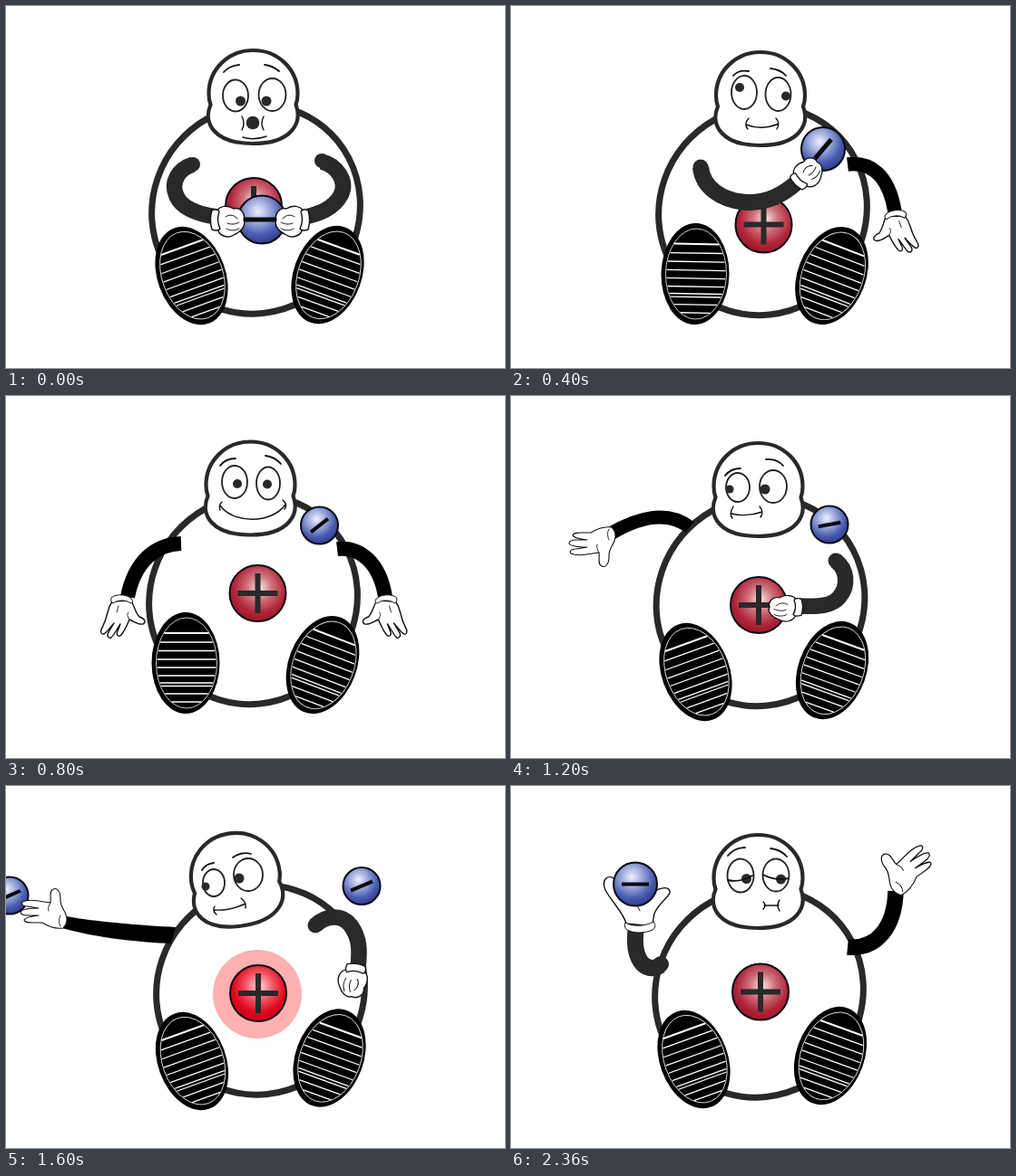
An HTML page that plays this animation: 550 by 400 pixels, repeating every 2600 ms.

```html
<!DOCTYPE html>
<html lang="en">
<head>
<meta charset="utf-8">
<title>Juggling buddy</title>
<style>
html, body { margin: 0; width: 100%; height: 100%; overflow: hidden; background: #fff; }
svg { display: block; width: 550px; height: 400px; }
</style>
</head>
<body>
<svg viewBox="0 0 550 400" xmlns="http://www.w3.org/2000/svg">
  <defs>
    <radialGradient id="red" cx=".53" cy=".4" r=".6">
      <stop offset="0" stop-color="#fae6e6"/><stop offset=".38" stop-color="#cf6f7a"/>
      <stop offset=".75" stop-color="#b0253a"/><stop offset="1" stop-color="#9d162a"/>
    </radialGradient>
    <radialGradient id="hot" cx=".52" cy=".38" r=".62">
      <stop offset="0" stop-color="#ffd9dc"/><stop offset=".4" stop-color="#f25562"/>
      <stop offset=".75" stop-color="#e0061c"/><stop offset="1" stop-color="#c40016"/>
    </radialGradient>
    <radialGradient id="blue" cx=".42" cy=".33" r=".68">
      <stop offset="0" stop-color="#eef1ff"/><stop offset=".35" stop-color="#9eabdc"/>
      <stop offset=".72" stop-color="#4a5cb0"/><stop offset="1" stop-color="#2e3d92"/>
    </radialGradient>
  </defs>
  <g id="stage"></g>
</svg>
<script>
const INK = '#292929', BLACK = '#000';

const line = (d, w = 1.4, color = '#111') =>
  `<path d="${d}" fill="none" stroke="${color}" stroke-width="${w}" stroke-linecap="round"/>`;
const shape = (d, w = 1.4) =>
  `<path d="${d}" fill="#fff" stroke="#111" stroke-width="${w}" stroke-linejoin="round"/>`;
const oval = (x, y, rx, ry, attrs) =>
  `<ellipse cx="${x}" cy="${y}" rx="${rx}" ry="${ry}" ${attrs}/>`;
const place = (transform, art) => `<g transform="${transform}">${art}</g>`;
const arm = (d, w, color = INK) =>
  `<path d="${d}" fill="none" stroke="${color}" stroke-width="${w}"/>`;
const dot = (x, y, r) => oval(x, y, r, r, `fill="${INK}"`);

function ball(x, y, r, fill, sign, w, color, turn = 0) {
  return place(`translate(${x} ${y})`,
    oval(0, 0, r - 1, r - 1, `fill="url(#${fill})" stroke="#0b0b12" stroke-width="2"`) +
    `<path d="${sign}" transform="rotate(${turn})" stroke="${color}" stroke-width="${w}"/>`);
}
const plus = (x, y, fill = 'red') => ball(x, y, 32, fill, 'M-22 0H22M0 -22V22', 6, INK);
const minus = (x, y, r, half, turn, w = 4) =>
  ball(x, y, r, 'blue', `M${-half} 0H${half}`, w, '#0b0b12', turn);

// Fist reaches along +x from the wrist
const fistArt =
  shape('M2 -9C6 -16 15 -16 21 -12C29 -14 34 -6 32 0C35 7 29 13 23 16C14 22 5 18 3 10Z') +
  shape('M-3 -10C0 -12 4 -11 5 -9C3 -3 3 4 6 10C4 13 0 12 -3 11C-5 4 -5 -4 -3 -10Z') +
  line('M13 10C18 13 23 12 27 10M12 -3C17 -7 23 -4 25 -1M14 4C19 6 23 5 27 3', 1);

// Open hand hangs along +y, thumb at -x
const openArt =
  shape('M-9 4C-13 12 -14 18 -18 22C-24 24 -26 28 -22 30C-16 31 -12 27 -7 25C-5 30 -2 37 2 42' +
    'C5 45 8 42 6 38L3 30C7 36 10 42 13 45C17 46 18 42 16 39L10 29C14 34 18 39 21 41' +
    'C25 42 25 37 23 34C20 28 18 22 17 17C16 12 14 8 12 5Z') +
  shape('M-10 3C-6 -3 8 -4 13 1C14 4 13 6 11 7C6 3 -4 3 -8 7C-10 7 -11 5 -10 3Z', 1) +
  line('M-6 17C-4 19 -5 22 -7 25M5 10L7 17', .9);

// Flat hand points along -x, thumb at -y
const flatArt =
  shape('M2 -8C0 -14 -5 -18 -4 -26C-4 -34 -8 -38 -12 -36C-17 -34 -14 -27 -15 -21L-22 -22' +
    'C-32 -24 -42 -24 -46 -22C-48 -19 -45 -17 -40 -17L-28 -15C-38 -15 -46 -14 -48 -11' +
    'C-48 -8 -44 -7 -40 -7L-28 -7C-36 -6 -43 -5 -44 -2C-43 1 -39 1 -34 1L-24 1' +
    'C-16 6 -8 8 -1 7C3 3 4 -3 2 -8Z', 1.1) +
  line('M-15 -21C-17 -18 -18 -15 -17 -12M-4 -7C-6 -3 -6 2 -4 5', .9);

const hand = (art, x, y, turn = 0, sx = 1, sy = 1) =>
  place(`translate(${x} ${y}) rotate(${turn}) scale(${sx} ${sy})`, art);

function foot([x, y, turn]) {
  let art = oval(0, 0, 37.5, 56, 'fill="#000"') +
    oval(1, 0, 33.5, 50, 'fill="none" stroke="#ddd" stroke-width=".9"');
  [-33, -23, -13.5, -4, 5, 14, 22, 25.5, 34, 43].forEach((v, i) => {
    const half = 33 * Math.sqrt(1 - v * v / 2500) - 1;
    art += line(`M${1 - half} ${v}H${1 + half}`, i ? 1.3 : 2, '#fff');
  });
  return place(`translate(${x} ${y}) rotate(${turn})`, art);
}

// Slightly fuller towards the upper right
const body = ([dx, dy]) => place(`translate(${275.5 + dx} ${224.5 + dy}) rotate(-50)`,
  oval(0, 0, 117.5, 113, `fill="#fff" stroke="${INK}" stroke-width="7"`));

const head = ([dx, dy, turn = 0]) => place(`translate(${dx} ${dy}) rotate(${turn} 272 101)`,
  `<path d="M225.500 109C224 105 223.500 101 223.500 97C223.500 70 245 49 272.500 49C300 49 321.500 70 321.500 97
   C321.500 101 321 105 319.500 109C327 129 315 152 272 152C229 152 217 129 225.500 109Z"
   fill="#fff" stroke="${INK}" stroke-width="4.2" stroke-linejoin="round"/>`);

// Eye: centre, radii, then pupil centre and radius
const eye = ([x, y, rx, ry, px, py, pr]) =>
  oval(x, y, rx, ry, 'fill="#fff" stroke="#222" stroke-width="1.8"') + dot(px, py, pr);

const poses = [
  {
    time: 400, body: [0, 0], head: [0, 0], feet: [[204.500, 298, -20], [354.500, 297, 20]],
    eyes: [[253, 99, 14, 17.5, 258.500, 105, 5.5], [293.500, 98, 15, 18, 287, 105, 5.5]],
    brows: 'M240 73Q246 66 257 65M285 65Q294 66 301 72',
    mouth: 'M260 122Q264 130 260 137M284 122Q280 130 284 137M261 145Q273 149 287 144',
    extra: dot(272, 129, 7.3),
    front: ball(273, 221, 32, 'red', 'M0 -22V0', 6, INK) + minus(282, 236, 27.5, 21, 0, 5) +
      arm('M206 175C190 180 181 195 188 210C194 224 212 230 232 233', 17.5) + dot(206, 175, 8) +
      arm('M348 172C364 176 377 193 369 209C361 224 345 230 326 234', 17.5) + dot(348, 171, 8) +
      hand(fistArt, 230, 236) + hand(fistArt, 330, 236, 0, -1)
  },
  {
    time: 400, body: [2, 1.5], head: [2.5, 2], feet: [[203, 296, 1], [353.500, 298, 21]],
    eyes: [[257, 95.500, 14, 18.5, 252, 90, 5], [294.500, 97.500, 14, 18.5, 303, 99.500, 5]],
    brows: 'M245 77Q251 70 262 72M286 69Q297 70 303 77',
    mouth: 'M259 131Q276 138 295 130M262 124Q256 131 261 136M292 124Q297 129 293 136',
    front: plus(278.500, 241.500) +
      arm('M209 178C211 200 232 216 262 217C284 217 300 208 315 195', 18) + dot(209, 178, 8.5) +
      minus(344, 158, 25, 14, -50, 5) + hand(fistArt, 316, 194, -45, .95, .9) +
      arm('M371 175C396 172 416 186 423 227', 15.5, BLACK) + hand(openArt, 422, 228, -4)
  },
  {
    time: 400, body: [-3, .5], head: [-3, 1.5], feet: [[198, 295, 0], [349, 297, 21]],
    eyes: [[252, 95, 14, 18, 255, 97, 5], [289, 96.500, 13, 18, 288, 97.500, 5]],
    brows: 'M236 77Q242 69 253 69M286 66Q296 67 303 75',
    mouth: 'M236 121C250 141 292 142 308 120M238 117Q234 120 236 126M305 115Q311 120 307 125',
    front: plus(277.500, 218) + minus(345.500, 143, 21.5, 12, -38) +
      arm('M193 163C165 164 142 182 134 222', 16, BLACK) +
      arm('M365 169C390 166 412 184 418 222', 16, BLACK) +
      hand(openArt, 129, 222, 0, -1) + hand(openArt, 417.500, 222)
  },
  {
    time: 400, body: [-.5, 2.5], head: [0, 3], feet: [[203.500, 305, -20], [354, 303, 20]],
    eyes: [[250, 101, 13, 16, 241, 103, 4.5], [289, 100, 15, 18, 280, 103, 5.5]],
    brows: 'M236 88Q242 80 253 80M281 70Q293 69 300 77',
    mouth: 'M243 130Q260 134 277 128M245 122Q240 130 244 135M274 122Q279 128 275 134',
    front: plus(273, 231) + minus(351, 142, 21.5, 12.5, -10) +
      arm('M197 145C172 126 140 134 110 152', 15, BLACK) + hand(flatArt, 112, 152, 0, 1, -1) +
      arm('M358 182C371 192 372 210 362 222C354 232 340 233 318 232', 17.5) + dot(358, 182, 8.5) +
      hand(fistArt, 317, 233, 0, -1, .85)
  },
  {
    time: 400, body: [5, 1], head: [-19, 3, -8], feet: [[205, 304, -20], [356.500, 300.500, 20]],
    eyes: [[229, 107, 12, 15, 220, 111, 4.5], [267, 98, 16, 18, 257, 102, 5.5]],
    brows: 'M216 93Q220 86 229 85M250 79Q260 72 270 75',
    mouth: 'M230 137Q246 138 264 130M230 133Q227 138 232 142M259 124Q265 128 264 135',
    front: oval(277, 230, 49, 49, 'fill="#ffb0b0"') + plus(278, 229, 'hot') +
      minus(392, 110.500, 21.5, 13, -23) + minus(4, 121, 21.5, 13, -24) +
      '<path d="M187 156C150 154 100 150 66 144L62 157C100 168 150 173 182 174Z"/>' +
      hand(flatArt, 64, 150) +
      arm('M341 154C352 143 370 141 380 154C390 168 390 182 388 200', 17.5) + dot(341, 154, 8.5) +
      hand(fistArt, 386, 201, 98, 1, .95)
  },
  {
    time: 600, body: [-2, 4], head: [0, 5], feet: [[201.500, 302, -20], [352, 298, 20]],
    eyes: [[253, 99, 14.5, 18.5, 259.500, 102.500, 5.5], [292, 98.500, 14.5, 18, 297.500, 103, 5.5]],
    brows: 'M239 77Q246 68 258 68M286 69Q297 70 304 78',
    mouth: 'M279 132H295M278 128Q282 132 278 136M296 126Q292 132 296 138',
    extra: line('M239 104Q252 107 266 99M278 98Q290 105 306 102', 1.8),
    front: plus(275, 227.500) +
      arm('M165 198C147 209 133 190 138 156', 18) + dot(165, 197, 9) +
      shape('M127 152C124 140 111 128 104 115C99 104 107 97 113 102L152 122C160 112 176 109 175 118' +
        'C172 125 163 129 158 141C156 148 157 151 156 155Z') +
      shape('M126 151C134 156 148 155 157 150C160 153 159 157 156 159C147 163 135 163 128 159C125 157 125 153 126 151Z', 1) +
      line('M115 114L122 126M139 132L142 138', 1) +
      minus(137, 108.500, 25, 15, 0) +
      arm('M371 178C403 181 423 156 424 116', 17.5, BLACK) + hand(flatArt, 425, 115, -36, -1.1, 1.1)
  }
];

const drawPose = p =>
  body(p.body) + p.feet.map(foot).join('') + head(p.head) + p.eyes.map(eye).join('') +
  line(p.brows, 1.8) + line(p.mouth) + (p.extra || '') + p.front;

const stage = document.getElementById('stage');
const art = poses.map(drawPose);
const loop = poses.reduce((sum, p) => sum + p.time, 0);
const start = performance.now();
let shown = -1;

function update(now) {
  let t = Math.max(0, now - start) % loop, i = 0;
  while (t >= poses[i].time) t -= poses[i++].time;
  if (i !== shown) stage.innerHTML = art[shown = i];
}

function tick() {
  update(performance.now());
  requestAnimationFrame(tick);
}
tick();
</script>
</body>
</html>
```
